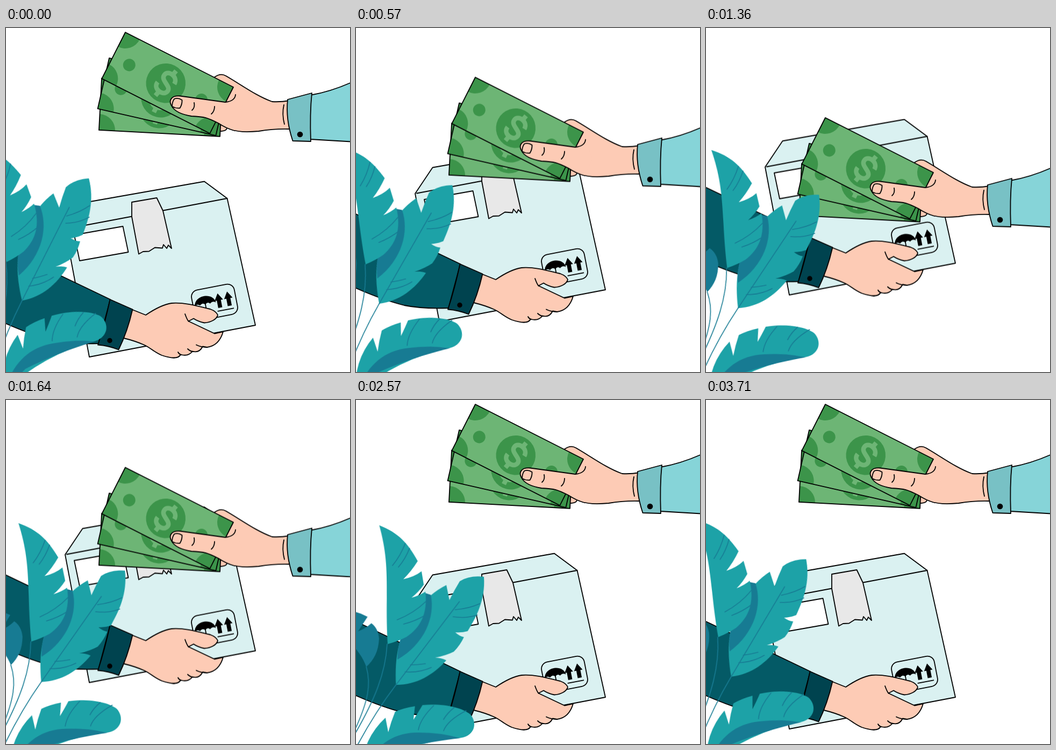
An HTML page without scripts that plays this animation: 640x640 px, repeating every 3780 ms.

```html
<!DOCTYPE html>
<html lang="en">
<head>
<meta charset="utf-8">
<title>Cash on delivery</title>
<style>
  html, body { margin: 0; width: 100%; height: 100%; overflow: hidden; background: #fff; }
  svg { display: block; width: 100vw; height: 100vh; }

  .ink { stroke: #000; stroke-width: 1.8; stroke-linejoin: round; stroke-linecap: round; }
  .line { fill: none; }
  .skin { fill: #fdcbb5; }
  .card { fill: #daf1f1; }
  .leaf { fill: #1da2a7; }
  .shade { fill: #177b93; }
  .vein { fill: none; stroke: #177b93; stroke-width: 1.6; stroke-linecap: round; }
  .note { fill: #6db575; }
  .print { fill: #3c944a; }

  #parcel, #cash, #plant { animation: 3780ms linear infinite; }
  #parcel { animation-name: lift; }
  #cash { animation-name: lower; }
  #plant { animation-name: sway; transform-origin: -72px 762px; }

  @keyframes lift {
    0% { transform: translateY(0); animation-timing-function: cubic-bezier(.37, 0, .63, 1); }
    29.1% { transform: translateY(-124.4px); }
    30.2% { transform: translateY(-124.4px); animation-timing-function: cubic-bezier(.12, 0, .39, 0); }
    43.39% { transform: translateY(-86.5px); }
    56.61% { transform: translateY(-20px); animation-timing-function: cubic-bezier(.61, 1, .88, 1); }
    62.96%, 100% { transform: translateY(0); }
  }
  @keyframes lower {
    0% { transform: translateY(0); animation-timing-function: cubic-bezier(.37, 0, .63, 1); }
    29.9% { transform: translateY(164.6px); }
    32.28% { transform: translateY(164.6px); animation-timing-function: cubic-bezier(.37, 0, .63, 1); }
    63.15%, 100% { transform: translateY(0); }
  }
  @keyframes sway {
    0% { transform: rotate(-10.87deg); }
    15.08% { transform: rotate(-7.84deg); }
    28.31% { transform: rotate(-5.47deg); }
    43.39% { transform: rotate(-2.57deg); }
    56.61% { transform: rotate(0deg); animation-timing-function: cubic-bezier(.33, .67, .67, 1); }
    61.77% { transform: rotate(.38deg); animation-timing-function: cubic-bezier(.33, 0, .67, .33); }
    67.99% { transform: rotate(-.39deg); }
    98.15% { transform: rotate(-6.97deg); }
    100% { transform: rotate(-7.4deg); }
  }
</style>
</head>
<body>
<svg viewBox="0 0 640 640" xmlns="http://www.w3.org/2000/svg">
  <defs>
    <clipPath id="edge"><rect width="225.4" height="96.6"/></clipPath>
    <g id="bill">
      <rect class="note" width="225.4" height="96.6"/>
      <g class="print" clip-path="url(#edge)">
        <circle r="30"/>
        <circle cx="225.4" r="30"/>
        <circle cy="96.6" r="30"/>
        <circle cx="225.4" cy="96.6" r="30"/>
        <circle cx="34" cy="51" r="11.5"/>
        <circle cx="183" cy="48" r="11.5"/>
        <circle cx="110" cy="50.5" r="36.8"/>
      </g>
      <path transform="translate(110 50.5) rotate(13)" fill="none" stroke="#6db575" stroke-width="8.5"
        d="M13 -9C11 -24 -13 -23 -12 -10C-11 3 13 -3 12 10C11 23 -13 23 -13 8M0 -18V-30M0 18V30"/>
      <rect class="ink line" width="225.4" height="96.6"/>
    </g>
    <path id="arrow" d="M0 -15L8 -2H3.8V12H-3.8V-2H-8Z"/>
  </defs>

  <g id="parcel">
    <path class="ink card" d="M110 374L142.500 325.500L369 285.500L411.500 317L464 553L155 612Z"/>
    <path class="ink line" d="M113 373.500L411.500 317"/>
    <path class="ink" fill="#fff" d="M127 385L217.500 369L227.500 417L137 433Z"/>
    <path class="ink" fill="#e8e8e8" d="M234 324L280.500 316L292 340L308 410L302 404L299 410L293 403L291 409.500L277 408.500L266 415.500L255 416L247 420.500L234 351Z"/>
    <g transform="translate(388.500 510) rotate(-11)">
      <rect class="ink line" x="-41" y="-28.500" width="81" height="57" rx="13"/>
      <path d="M-38 1C-36 -20 0 -20 2 1Q-4 -4 -9 1Q-13 -4 -18 1Q-23 -4 -28 1Q-33 -4 -38 1Z"/>
      <path class="ink line" d="M-18 0V12M2.500 17.700H32"/>
      <use href="#arrow" x="8"/>
      <use href="#arrow" x="26"/>
    </g>
    <path class="ink" fill="#045a66" d="M-20 403L0 412L194 505L172 587Q125 589 90 582Q50 572 0 550L-20 541Z"/>
    <path class="ink skin" d="M230 522L260 534Q288 515 308 512C335 510 362 519 380 523Q391 527 394 534C392 542 381 548 369 548.500Q357 546 349 540.500L339.500 545.500L388 568.500L404 565C399 582 390 592 374 594L366 592.500C361 602 355 604 347 601.500C341 609 333 610 325 607.500C321 615 311 616 290 609C277 604 267 594 258 590Q240 582 219 577Z"/>
    <path class="ink line" d="M333 532Q337 543 339.500 545.500M354 589.500Q363 594 374 594M338 597Q343 602 349 602M320 603Q322 607 326 608"/>
    <path class="ink" fill="#00434f" d="M193.500 505L235.500 523.500Q226 565 209.500 598.500Q191 591 171 589.500Q184 550 193.500 505Z"/>
    <circle cx="193" cy="581.500" r="4.700"/>
  </g>

  <g id="cash">
    <path class="ink skin" d="M380 96L387 92Q399 83 409 89C440 107 465 126 495 137Q510 138 528 135V188Q500 187 470 192C448 194 432 194 420 189L411 183Q413 192 398 192L380 170Z"/>
    <use href="#bill" transform="translate(178 93.500) rotate(3)"/>
    <use href="#bill" transform="translate(192 56) rotate(12.800)"/>
    <use href="#bill" transform="translate(222 8) rotate(26.900)"/>
    <path class="skin" d="M427 124Q426 135 408 138L324 126.500C308 125 303 134 307 143C313 156 328 161 345 164C370 165 375 167 395 177Q410 187 425 191L440 160Z"/>
    <path class="ink line" d="M427 124Q426 136 408 138L324 126.500C308 125 303 134 307 143C313 156 328 161 345 164C370 165 375 167 395 177Q410 187 425 191M313 132Q320 129 327.500 134Q328 142 323.500 149Q316 150 309 146Q309 138 313 132M350 139Q352 148 346 153M388 146Q388 155 382 160M517 143Q513 160 518 179"/>
    <path class="ink" fill="#86d4d8" d="M566 125Q602 119 642 101.500V211.500L566 207Z"/>
    <path class="ink" fill="#78c1c5" d="M524 133L569 121Q565 160 567 211L533.500 210Q520 170 524 133Z"/>
    <circle cx="547" cy="198" r="5.300"/>
  </g>

  <g id="plant">
    <path class="vein" d="M76 531Q38 580 5 640L-30 705M60 455C57 510 35 560 0 620L-40 690M21 497C30 530 24 560 0 612L-30 670"/>
    <path class="shade" d="M-45 390Q-10 386 24 404L6 431Q20 426 31 416Q44 426 45 445C44 468 35 485 21 497C15 480 5 465 -15 445Z"/>

    <path class="leaf" d="M241 331Q214 328 196 339Q186 355 176.500 374L171 346Q140 361 115 393C80 435 74 480 76 531C115 531 145 513 170 486Q160 481 149 481Q170 477 184 470Q196 458 203 443Q194 441 187 434Q199 435 210 432C225 408 244 375 241 331Z"/>
    <path class="shade" d="M130 360L142 364C150 405 130 455 79 484Q79 464 85 446Z"/>
    <path class="vein" d="M76 531L195 377M187 392Q213 390 233 381M183 405Q207 409 228 402M103 494Q118 494 131 492M93 507Q120 509 142 499"/>

    <path class="leaf" d="M47 234C82 248 100 267 118 301Q106 320 91 334.500Q112 330 125 320L129 345Q119 359 106 369Q121 365 132 358C136 400 122 425 96 442Q80 450 61 455Q59 420 60 370C61 310 59 280 47 234Z"/>
    <path class="vein" d="M95 268Q86 291 71 309M103 277Q95 297 82 312M133 376Q110 398 79 410M131 402Q112 413 91 418"/>

    <path class="leaf" d="M10 690Q14 630 56 592L61 619Q66 600 74 581Q90 574 111 571L108 596Q118 581 125 569C165 566 198 574 214 587C228 603 222 630 190 631Q100 637 10 690Z"/>
    <path class="shade" d="M10 690C38 645 65 622 111 620Q155 619 195 631C130 638 90 648 58 657Z"/>
    <path class="vein" d="M146 570Q121 594 117 615M184 574Q171 584 164 596M206 580Q171 598 164 617"/>
  </g>
</svg>
</body>
</html>
```
